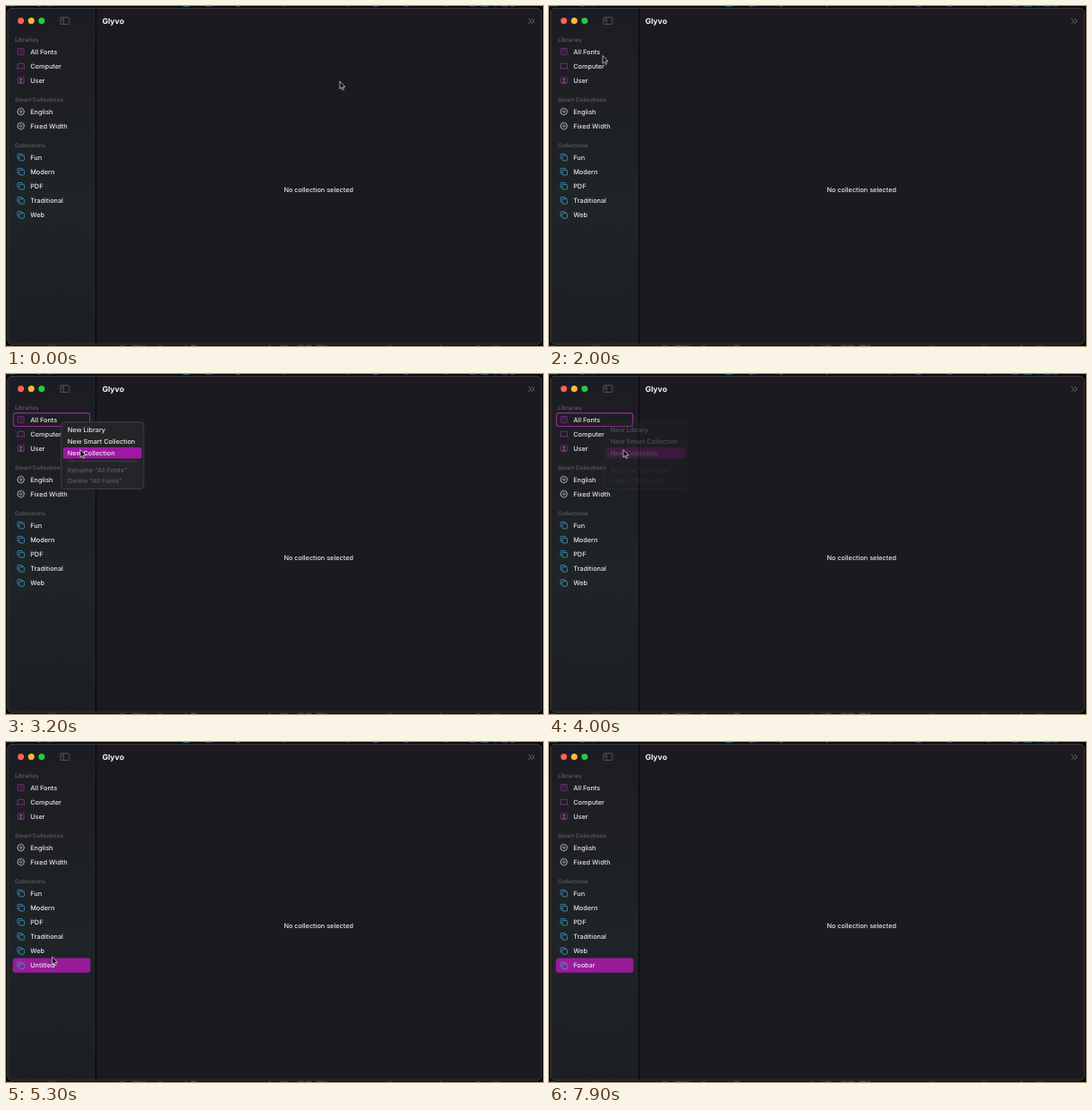
These frames come from a looping animation (600x380 px, 8000 ms). An HTML page:

```html
<!DOCTYPE html>
<html lang="en">
<head>
<meta charset="utf-8">
<title>Font manager</title>
<style>
html, body { margin: 0; width: 100%; height: 100%; overflow: hidden; background: #04060a; }
svg { display: block; width: 600px; height: 380px; }
text { font: 500 7.3px Inter, "Open Sans", sans-serif; fill: #e9e8ea; text-rendering: geometricPrecision; white-space: pre; }
.head { font-size: 6.3px; font-weight: 600; fill: #56595d; }
.title { font-size: 8.7px; font-weight: 700; fill: #f0eff1; }
.off { fill: #5d5b60; }
.line { fill: none; stroke-width: .8; stroke-linejoin: round; }
.plum { stroke: #8d338f; }
</style>
</head>
<body>
<svg viewBox="0 0 600 380">
  <defs>
    <linearGradient id="side" x2="0" y2="1">
      <stop offset="0" stop-color="#1c1d24"/>
      <stop offset=".3" stop-color="#1e2023"/>
      <stop offset=".6" stop-color="#1e2428"/>
      <stop offset="1" stop-color="#1d1f21"/>
    </linearGradient>
    <clipPath id="win"><rect x="1.5" y="2" width="597" height="376.5" rx="5"/></clipPath>
    <g id="list" class="line plum">
      <rect x="-3.3" y="-3.4" width="6.7" height="6.8" rx=".6"/>
      <path d="M-1.4-1.4H1.8M-1.4 .2H1.8" stroke-width=".6"/>
    </g>
    <g id="laptop" class="line plum">
      <path d="M-3.5 2.6V-2.8H3.7V2.6M-4.8 2.8H5"/>
    </g>
    <g id="user">
      <rect class="line plum" x="-3.3" y="-3.4" width="6.7" height="6.8" rx=".6"/>
      <path d="M-1.2-1A1.25 1.25 0 1 1 1.3-1 1.25 1.25 0 1 1-1.2-1M-2.1 2.3Q.1-.6 2.3 2.3Z" fill="#a445a6"/>
    </g>
    <g id="gear" class="line" stroke="#b9babc">
      <circle r="3.6"/><circle r="1.2"/>
      <circle r="4.1" stroke-dasharray="1 1.15" stroke-width=".6"/>
    </g>
    <g id="stack" class="line" stroke="#3f9fc6">
      <path d="M-2.2 1.8H-2.8Q-3.7 1.8-3.7 .9V-2.8Q-3.7-3.7-2.8-3.7H.9Q1.8-3.7 1.8-2.8V-2"/>
      <rect x="-1.8" y="-1.8" width="5.6" height="5.6" rx=".9"/>
    </g>
  </defs>

  <rect width="600" height="380" fill="#04060a"/>
  <g id="specks"></g>
  <g clip-path="url(#win)">
    <rect width="600" height="380" fill="#1c1a1f"/>
    <rect width="100" height="380" fill="url(#side)"/>
    <rect x="99.9" width="1.1" height="380" fill="#09090b"/>
  </g>
  <rect class="line" x="1.9" y="2.4" width="596.2" height="375.7" rx="5" stroke="#444448"/>

  <g id="lights"></g>
  <g class="line" stroke="#5c5e62">
    <rect x="60.8" y="12.7" width="10" height="7.7" rx="1.2"/>
    <path d="M64.3 12.7V20.4M62 14.8H63.2M62 16.3H63.2"/>
  </g>
  <path class="line" stroke="#858488" d="M583.8 14L586.7 16.9 583.8 19.8M587.2 14L590.1 16.9 587.2 19.8"/>
  <text class="title" x="107.4" y="19.6">Glyvo</text>
  <text x="349.2" y="207.8" text-anchor="middle">No collection selected</text>

  <rect id="ring" class="line" x="8.3" y="43.6" width="85.3" height="14.9" rx="3" stroke="#942a97" style="stroke-width:1.1"/>
  <g id="items"></g>

  <g id="fresh">
    <rect x="7.6" y="241.5" width="86.8" height="16.2" rx="3" fill="#991b9a"/>
    <rect id="field" x="26" y="244.4" width="65.2" height="10.6" fill="#b443b5"/>
    <rect id="mark" x="27" y="244.4" height="10.6" fill="#d07bd1"/>
    <use href="#stack" x="16.6" y="249.6"/>
    <text id="name" x="27.2" y="252.4"></text>
    <rect id="caret" y="244.9" width=".8" height="9.6" fill="#f4e4f4"/>
  </g>

  <g id="menu">
    <rect x="61.7" y="53.7" width="92.2" height="74.8" rx="3.8" fill="#252428" stroke="#47464a" stroke-width=".8"/>
    <rect id="hot" x="63.8" width="87.8" height="12.7" rx="2.4" fill="#a018a2"/>
    <path d="M69 97.4H146.5" stroke="#454448" stroke-width=".8"/>
  </g>

  <path id="arrow" d="M0 0V8.6L1.9 6.9 3.2 9.9 4.6 9.2 3.3 6.3H5.9Z" fill="#0b0b0c" stroke="#e6e6e6" stroke-width=".7" stroke-linejoin="round"/>
</svg>
<script>
const $ = id => document.getElementById(id);
const NS = 'http://www.w3.org/2000/svg';
const LOOP = 8000, STEP = 100;

function add(parent, tag, attrs, text = '') {
  const el = document.createElementNS(NS, tag);
  for (const key in attrs) el.setAttribute(key, attrs[key]);
  el.textContent = text;
  $(parent).append(el);
}

['#ff5f57', '#febc2e', '#28c840'].forEach((fill, i) =>
  add('lights', 'circle', { cx: 16.6 + i * 11.6, cy: 16.6, r: 3.5, fill }));

// Sidebar: each group is a heading followed by evenly spaced rows
function group(title, top, labels, icons) {
  add('items', 'text', { class: 'head', x: 9.9, y: top + 2.4 }, title);
  labels.forEach((label, i) => {
    const y = top + 13.5 + i * 16.1;
    add('items', 'use', { href: '#' + icons[i % icons.length], x: 16.6, y });
    add('items', 'text', { x: 27.2, y: y + 2.7 }, label);
  });
}
group('Libraries', 37.5, ['All Fonts', 'Computer', 'User'], ['list', 'laptop', 'user']);
group('Smart Collections', 104.5, ['English', 'Fixed Width'], ['gear']);
group('Collections', 155.5, ['Fun', 'Modern', 'PDF', 'Traditional', 'Web'], ['stack']);

// Context menu: the last two entries are disabled, below a separator
['New Library', 'New Smart Collection', 'New Collection', 'Rename "All Fonts"', 'Delete "All Fonts"']
  .forEach((label, i) => {
    const off = i > 2;
    add('menu', 'text', { x: 68.8, y: 65.2 + i * 12.8 + off * 6, class: off ? 'off' : '' }, label);
  });

// Slivers of desktop around the window
let seed = 7;
const rand = () => (seed = seed * 16807 % 2147483647) / 2147483647;
for (let i = 0; i < 40; i++) {
  add('specks', 'rect', {
    x: rand() * 600, y: i % 2 * 379, width: 2 + rand() * 7, height: 1,
    fill: '#3a5866', opacity: .3 + rand() * .5
  });
}

const clamp = v => Math.min(1, Math.max(0, v));
const smooth = p => p * p * (3 - 2 * p);
const easeOut = p => Math.sin(p * Math.PI / 2);

const moves = [
  { from: 1200, to: 2000, x: 60, y: 55.5, ease: smooth },
  { from: 2600, to: 3200, x: 83, y: 84.5, ease: smooth },
  { from: 4500, to: 5500, x: 50, y: 248, ease: easeOut }
];

function pointer(t) {
  let x = 373, y = 84;
  for (const m of moves) {
    const p = m.ease(clamp((t - m.from) / (m.to - m.from)));
    x += (m.x - x) * p;
    y += (m.y - y) * p;
  }
  return [x, y];
}

function nameAt(t) {
  if (t < 5900) return 'Untitled';
  const count = t < 6500 ? 1 : t < 6900 ? 2 : 3 + Math.floor((t - 6900) / 150);
  return 'Foobar'.slice(0, count);
}

const show = (id, on) => $(id).setAttribute('opacity', +on);

function render(t) {
  const [x, y] = pointer(t);
  $('arrow').setAttribute('transform', `translate(${x} ${y})`);
  show('arrow', t < 5900);

  const open = t >= 2100 && t < 4100;
  show('menu', open && (t < 4000 ? 1 : .24));
  show('ring', open && clamp((t - 1900) / 300));
  const item = Math.min(2, Math.max(0, Math.floor((y - 56.3) / 12.8)));
  $('hot').setAttribute('y', 56.3 + item * 12.8);
  show('hot', t >= 2700 && t !== 3800);

  const editing = t >= 5400 && t < 7600;
  show('fresh', clamp((t - 4100) / 200));
  show('field', editing);
  $('name').textContent = nameAt(t);
  const width = $('name').getComputedTextLength();
  $('mark').setAttribute('width', width);
  show('mark', editing && t < 5900);
  $('caret').setAttribute('x', 27.2 + width);
  show('caret', editing && t >= 5900);
}

const start = performance.now();
function tick() {
  const t = (performance.now() - start) % LOOP;
  render(Math.floor(t / STEP) * STEP);
  requestAnimationFrame(tick);
}
tick();
</script>
</body>
</html>
```
